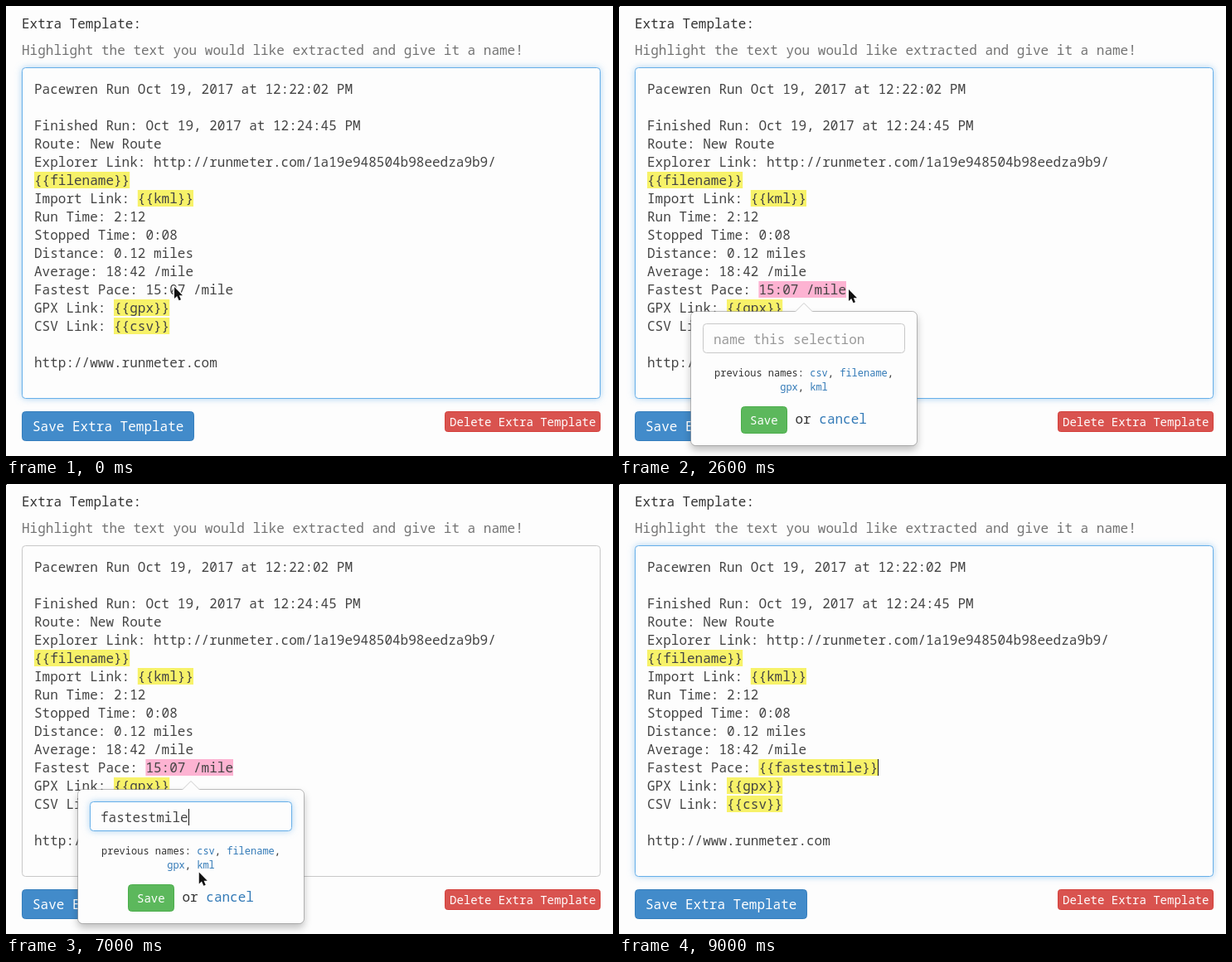
These frames come from a looping animation (732x543 px, 9200 ms). An HTML page with a canvas:

```html
<!DOCTYPE html>
<html lang="en">
<head>
<meta charset="utf-8">
<title>Extra Template</title>
<style>
  html, body { margin: 0; width: 100%; height: 100%; overflow: hidden; background: #fdfdfd; }
  canvas { display: block; }
</style>
</head>
<body>
<canvas id="stage" width="732" height="543"></canvas>
<script>
const ctx = document.getElementById('stage').getContext('2d');
const LOOP = 9200, STEP = 200;
const INK = '#444', LINK = '#337ab7', PAPER = '#fdfdfd', YELLOW = '#f7f269', PINK = '#fdb3d2';
const CHAR = 9.6, LEFT = 34, VALUE_X = LEFT + 14 * CHAR;
const NAME = 'fastestmile';

// Moments of the story, in ms
const DRAG = 1200, FOCUS_INPUT = 3400, HOVER = 4000, TYPING = 5400, TYPED = 6800,
      SAVED = 7400, REFRESHED = 7800;

const note = pace => [
  'Pacewren Run Oct 19, 2017 at 12:22:02 PM',
  '',
  'Finished Run: Oct 19, 2017 at 12:24:45 PM',
  'Route: New Route',
  'Explorer Link: http://runmeter.com/1a19e948504b98eedza9b9/',
  '{{filename}}',
  'Import Link: {{kml}}',
  'Run Time: 2:12',
  'Stopped Time: 0:08',
  'Distance: 0.12 miles',
  'Average: 18:42 /mile',
  'Fastest Pace: ' + pace,
  'GPX Link: {{gpx}}',
  'CSV Link: {{csv}}',
  '',
  'http://www.runmeter.com'
];

// Pointer: time, x, y, shape shown from that time on
const pointerKeys = [
  [0, 203, 339, 'arrow'], [200, 203, 339, 'arrow'], [400, 190, 341, 'beam'],
  [800, 168, 342, 'beam'], [DRAG, 168, 342, 'beam'], [1800, 267, 341, 'beam'],
  [2000, 277, 342, 'beam'], [2600, 277, 342, 'arrow'], [3200, 230, 400, 'beam'],
  [3600, 230, 402, 'arrow'], [HOVER, 288, 436, 'hand'], [TYPING, 288, 436, 'none'],
  [TYPED, 288, 436, 'arrow'], [7200, 177.5, 501, 'hand'], [REFRESHED, 177.5, 501, 'hand'],
  [8400, 178, 550, 'none'], [LOOP, 203, 339, 'none']
];

const arrow = new Path2D('M0 0V14L3.2 11 5.6 16.2 8 15.2 5.8 10.2H10Z');
const beam = new Path2D('M-3-8Q0-8 0-6Q0-8 3-8M0-6V6M-3 8Q0 8 0 6Q0 8 3 8M-2 1H2');
const hand = new Path2D('M-3 1c0-2 3-2 3 0v6c1-1 3-1 3 .5 1-1 3-.7 3 .8 1-.8 2.5-.2 2.5 1.2v4l-2 4h-7l-5-7c-1-2 1-3 2.5-1.5z');

function text(string, x, y, color = INK, size = 16, weight = 400) {
  ctx.font = `${weight} ${size}px "Noto Sans Mono", monospace`;
  ctx.fillStyle = color;
  ctx.fillText(string, x, y);
}

function rect(x, y, w, h, color) {
  ctx.fillStyle = color;
  ctx.fillRect(x, y, w, h);
}

function box(x, y, w, h, radius, fill, border, shadow, blur = 0, drop = 0) {
  ctx.beginPath();
  ctx.roundRect(x + .5, y + .5, w - 1, h - 1, radius);
  ctx.save();
  if (shadow) {
    ctx.shadowColor = shadow;
    ctx.shadowBlur = blur;
    ctx.shadowOffsetY = drop;
  }
  ctx.fillStyle = fill;
  ctx.fill();
  ctx.restore();
  ctx.lineWidth = 1;
  ctx.strokeStyle = border;
  ctx.stroke();
}

function field(x, y, w, h, focused) {
  if (focused) box(x, y, w, h, 4, PAPER, '#66afe9', 'rgba(102,175,233,.6)', 8);
  else box(x, y, w, h, 4, PAPER, '#c8c8c8');
}

const caret = (x, y) => rect(Math.round(x), y, 1, 20, '#111');

function page(t, selected) {
  text('Extra Template:', 19, 27, '#333', 16, 500);
  text('Highlight the text you would like extracted and give it a name!', 19, 59, '#737373');
  field(19, 74, 698, 400, t < FOCUS_INPUT || t >= REFRESHED);

  rect(VALUE_X, 332, selected * CHAR, 20, PINK);
  note(t < SAVED ? '15:07 /mile' : `{{${NAME}}}`).forEach((line, i) => {
    const y = 106 + 22 * i;
    const tag = line.match(/{{.*}}/);
    if (tag && (i !== 11 || t >= REFRESHED))
      rect(LEFT + tag.index * CHAR, y - 16, tag[0].length * CHAR, 20, YELLOW);
    text(line, LEFT, y);
  });

  box(19, 489, 208, 36, 4, '#428bca', '#357ebd');
  text('Save Extra Template', 32, 513, '#fff', 16, 500);
  box(529, 489, 188, 25, 3, '#d9534f', '#d43f3a');
  text('Delete Extra Template', 535, 507, '#fff', 14, 500);
}

function popover(t, center, blinkOn) {
  const x = center - 137;
  box(x, 368, 274, 163, 6, PAPER, 'rgba(0,0,0,.25)', 'rgba(0,0,0,.25)', 10, 5);
  ctx.beginPath();
  ctx.moveTo(center - 10.5, 369);
  ctx.lineTo(center, 358.5);
  ctx.lineTo(center + 10.5, 369);
  ctx.fillStyle = PAPER;
  ctx.fill();
  ctx.strokeStyle = '#ccc';
  ctx.stroke();

  field(x + 15, 383, 244, 36, t >= FOCUS_INPUT);
  const count = t < TYPING ? 0
    : t <= 6000 ? Math.floor((t - TYPING) / STEP)
    : Math.min(NAME.length, 3 + (t - 6000) / 100);
  if (count) text(NAME.slice(0, count), x + 28, 408);
  else text('name this selection', x + 28, 408, '#999');
  if (t >= FOCUS_INPUT && (count || blinkOn)) caret(x + 28 + count * CHAR, 392);

  text('previous names:', x + 29, 447, '#333', 12);
  text('csv', x + 144.2, 447, LINK, 12);
  text(',', x + 165.8, 447, '#333', 12);
  const hovered = t >= HOVER && t < 7000;
  const nameColor = hovered ? '#23527c' : LINK;
  text('filename', x + 180.2, 447, nameColor, 12);
  if (hovered) rect(x + 180.2, 448, 57.6, 1, nameColor);
  text(',', x + 237.8, 447, '#333', 12);
  text('gpx', x + 108.2, 464, LINK, 12);
  text(',', x + 129.8, 464, '#333', 12);
  text('kml', x + 144.2, 464, LINK, 12);

  box(x + 61, 483, 56, 33, 4, '#5cb85c', '#4cae4c');
  text('Save', x + 72, 505, '#fff', 14, 500);
  text('or', x + 126.5, 504, '#333');
  text('cancel', x + 155.3, 504, LINK);
}

function pointer(t) {
  const i = pointerKeys.findIndex(key => key[0] > t);
  const [t0, x0, y0, shape] = pointerKeys[i - 1], [t1, x1, y1] = pointerKeys[i];
  if (shape === 'none') return;
  const k = (t - t0) / (t1 - t0);
  ctx.save();
  ctx.translate(x0 + (x1 - x0) * k, y0 + (y1 - y0) * k);
  ctx.lineJoin = 'round';
  if (shape === 'hand') {
    ctx.fillStyle = '#fff';
    ctx.fill(hand);
    ctx.lineWidth = 1.3;
    ctx.strokeStyle = '#111';
    ctx.stroke(hand);
  } else {
    const path = shape === 'beam' ? beam : arrow;
    ctx.lineWidth = 2.6;
    ctx.strokeStyle = '#fff';
    ctx.stroke(path);
    ctx.lineWidth = 1.2;
    ctx.strokeStyle = ctx.fillStyle = '#111';
    if (path === beam) ctx.stroke(beam);
    else ctx.fill(arrow);
  }
  ctx.restore();
}

function draw(now) {
  const t = Math.floor(now % LOOP / STEP) * STEP;
  const blinkOn = Math.floor(t / 500) % 2 === 0;
  const selected = t >= SAVED ? 0 : Math.max(0, Math.min(11, 1 + (t - DRAG) / STEP * 3 - (t <= DRAG)));
  rect(0, 0, 732, 543, PAPER);
  page(t, selected);
  if (selected) popover(t, Math.round(VALUE_X + 2 + selected * CHAR / 2), blinkOn);
  if (t >= SAVED && t < REFRESHED) caret(VALUE_X + 11 * CHAR, 332);
  if (t >= REFRESHED && blinkOn) caret(VALUE_X + 15 * CHAR, 332);
  if (t >= 2200) rect(0, 0, 1, 1, '#000');
  pointer(t);
  requestAnimationFrame(draw);
}
requestAnimationFrame(draw);
</script>
</body>
</html>
```
